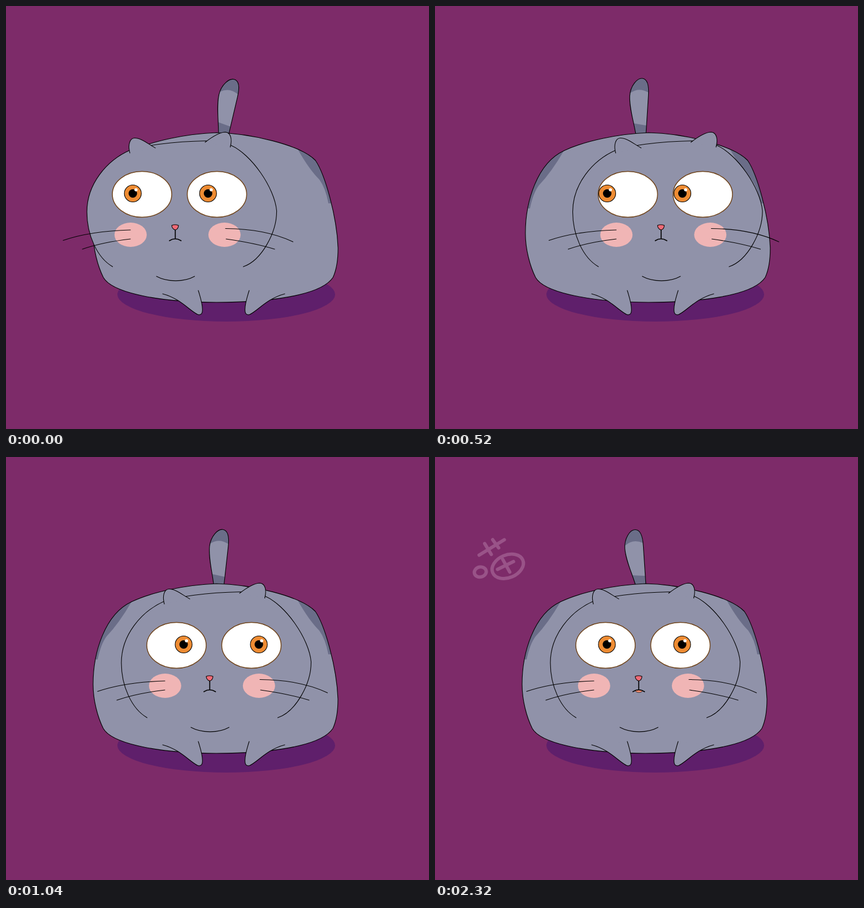
An HTML page that plays this animation: 748x748 px, repeating every 2.36 s.

```html
<!DOCTYPE html>
<html lang="en">
<head>
<meta charset="utf-8">
<title>Cat</title>
<style>
  html, body { margin: 0; width: 100%; height: 100%; overflow: hidden; background: #7d2b69; }
  svg { display: block; width: 100vw; height: 100vh; }
  .fur { fill: #9092a9; }
  .line { stroke: #000; stroke-width: 1.1; stroke-linecap: round; stroke-linejoin: round; }
  .bare { fill: none; }
  .dark { fill: #6a6d88; }
</style>
</head>
<body>
<svg viewBox="0 0 748 748">
  <defs>
    <path id="tailShape" d="M365 238C361 208 351 183 352 159C353 141 365 127 374 128C383 129 386 141 385 158L380.500 238"/>
    <path id="bodyShape" d="M372 224C320 226 260 238 222 256C175 278 154 345 154 402C154 430 162 460 172 480C188 508 275 524 372 524C460 524 556 513 578 480C585 465 587 445 587 428C585 372 564 298 547 273C520 245 430 225 372 224Z"/>
    <clipPath id="inTail"><use href="#tailShape"/></clipPath>
    <clipPath id="inBody"><use href="#bodyShape"/></clipPath>
  </defs>
  <ellipse cx="389.500" cy="510" rx="192.500" ry="48" fill="#5f1f6b"/>

  <g id="tail">
    <use href="#tailShape" class="fur"/>
    <path class="dark" clip-path="url(#inTail)" d="M340 120H400V158L385 153Q368 143 353 154L340 163ZM350 206L392 213V245H350Z"/>
    <use href="#tailShape" class="bare line"/>
  </g>

  <g id="body">
    <use href="#bodyShape" class="fur"/>
    <path class="dark" clip-path="url(#inBody)" d="M222 256Q200 294 178 317Q168 330 162 358H140V240H222ZM515 252Q535 288 554 307Q565 322 570 349H600V240H515Z"/>
    <use href="#bodyShape" class="bare line"/>
  </g>

  <path id="foot" class="fur line" d="M277 509C308 517 325 539 339 545.500C350 549 350 534 340 503"/>
  <use href="#foot" transform="translate(770) scale(-1 1)"/>

  <g id="head">
    <path class="fur line" d="M249.500 461C222 445 204 405 204 364C204 315 239 273 280 255C302 247.500 355 239.500 414 238.500C430 238 445 240 458 246C495 262 536 322 539.500 362C540 400 513 450 480.500 461"/>
    <path class="fur line" d="M280 260C276 245 280 234 288 233.500C299 233 311 243 325 251"/>
    <path class="fur line" d="M413 241C426 231 440 223 449 223C459 224 461 236 457.500 249.500"/>
    <ellipse id="eye" cx="301.500" cy="333" rx="52.500" ry="40.500" fill="#fff" stroke="#70451c" stroke-width="1.500"/>
    <use href="#eye" x="132.500"/>
    <g id="pupils">
      <g id="pupil">
        <circle class="line" cx="304" cy="331.500" r="15" fill="#ee8c33"/>
        <circle cx="304" cy="331.500" r="7.500"/>
        <circle id="glint" cx="309.300" cy="325" r="2.800" fill="#fff"/>
      </g>
      <use href="#pupil" x="133"/>
    </g>
    <ellipse id="cheek" cx="281.300" cy="404.500" rx="28.500" ry="21.500" fill="#f0b5b5"/>
    <use href="#cheek" x="166"/>
    <path class="bare line" d="M281 396Q210 398 162 414.500M281 412Q230 418 196 430M449 393.500Q520 394 568.500 417M450 412Q500 419 536 430M327 478C346 488.500 376 488.500 394.500 478"/>
    <path id="mouth" class="line" fill="#f58f72" style="stroke-width:.7"/>
    <path class="bare line" style="stroke-width:1.700" d="M360.300 396V411.500M350 415Q360 408.500 370.500 415"/>
    <path class="line" fill="#f06a76" d="M354 388Q360 385.500 366 388Q365.500 395 360 396Q354.500 394 354 388Z"/>
  </g>

  <g id="meow" fill="none" stroke="#f6d9ee" stroke-width="5" stroke-linecap="round">
    <path d="M-25 -14L17 -28M-13 -29L-7 -11M0 -32L6 -18M-3 13L23 7M8 0L14 21"/>
    <ellipse cx="-29" cy="11" rx="9" ry="7.500"/>
    <ellipse cx="13" cy="12" rx="24.500" ry="17" transform="rotate(-10 13 12)"/>
  </g>
</svg>
<script>
  const LOOP = 2360, STEP = 40;
  const part = id => document.getElementById(id);
  const place = (id, transform) => part(id).setAttribute("transform", transform);

  // Smooth rise from 0 to 1
  function ease(t, start, length) {
    const u = Math.min(1, Math.max(0, (t - start) / length));
    return u * u * (3 - 2 * u);
  }

  // Tail swing from 1 (right) to 0 (left); its base trails the first return
  const swing = (t, lag) => 1 - ease(t, 0, 360) + ease(t, 360 + lag, 350)
    - ease(t, 840, 460) + ease(t, 1300, 440) - ease(t, 1890, 350);

  function draw(t) {
    const headX = -62 + 125 * (ease(t, -20, 370) - ease(t, 408, 404)) + 62 * ease(t, 812, 190);
    const bodyX = 11.7 * (ease(t, -20, 280) - ease(t, 400, 240));
    const glance = ease(t, -50, 150) - ease(t, 310, 150) + ease(t, 750, 150);
    const gazeX = -39 + 78 * glance - 39 * ease(t, 960, 120);
    place("head", `translate(${headX})`);
    place("body", `translate(${bodyX})`);
    place("pupils", `translate(${gazeX})`);
    place("glint", `translate(${0.5 * Math.sin(t / 80 * Math.PI + 0.6)})`);
    place("tail", `translate(${21.5 * swing(t, 130) - 8.5}) rotate(${17 * swing(t, 0) - 7} 372 224)`);

    const lip = 412 + 16 * ease(t, 1600, 120) - 10.5 * ease(t, 1720, 160);
    part("mouth").setAttribute("d", lip > 412 ? `M354 413Q360 410 367 413C366 ${lip} 355 ${lip} 354 413Z` : "");

    const drift = Math.min(1, (t - 1700) / 540);
    part("meow").setAttribute("opacity", drift > 0 ? 0.72 - 0.49 * drift : 0);
    place("meow", `translate(${194 - 83.5 * drift} ${257 - 74 * drift}) rotate(${9 - 22 * drift}) scale(${0.88 + 0.3 * drift})`);
  }

  function frame() {
    draw(Math.floor(performance.now() % LOOP / STEP) * STEP);
    requestAnimationFrame(frame);
  }
  frame();
</script>
</body>
</html>
```
